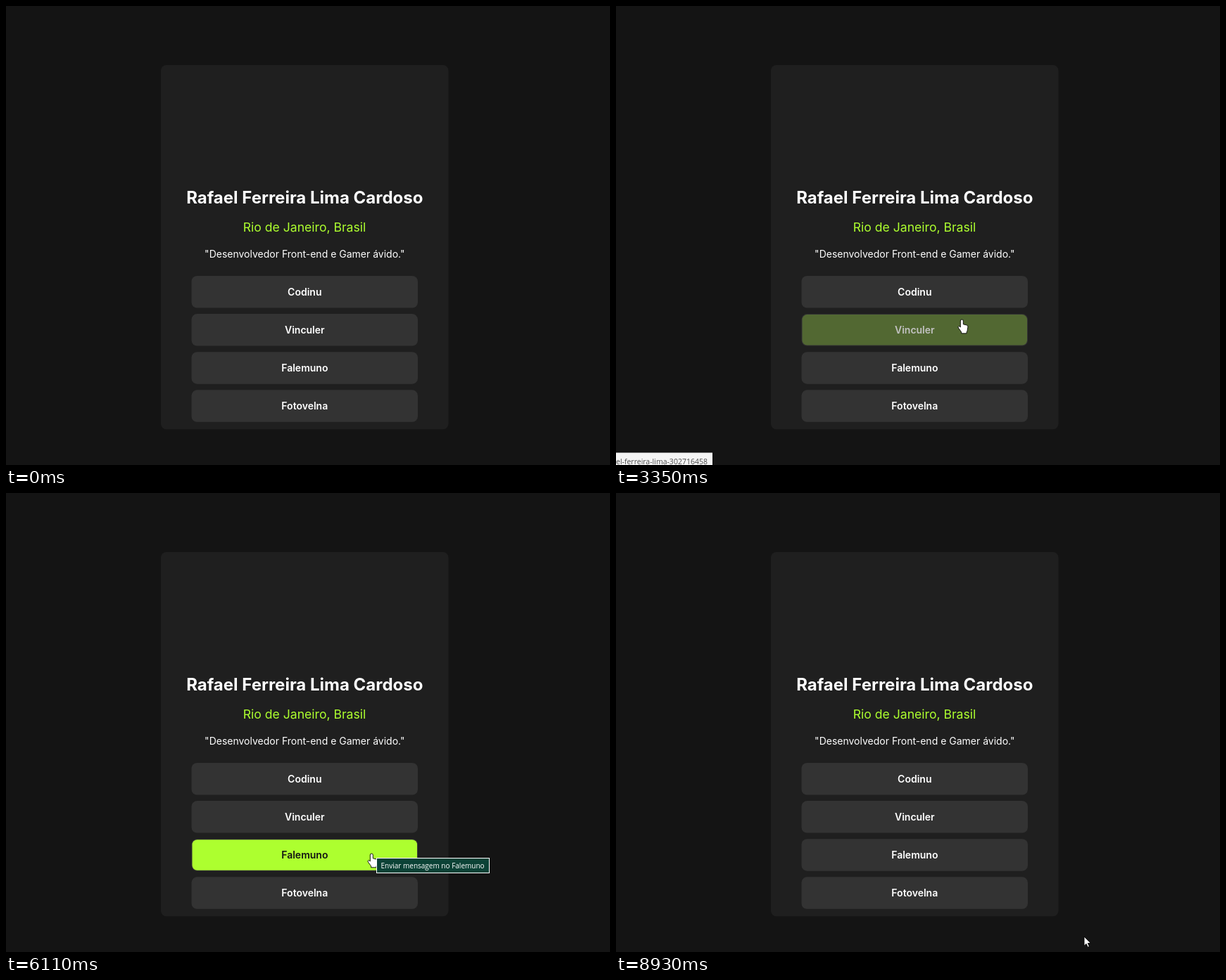
Write an HTML page that moves like this. It is 858x653 px and loops after 9.13 s.

```html
<!DOCTYPE html>
<html lang="pt-BR">
<head>
<meta charset="utf-8">
<title>Perfil</title>
<style>
  html, body { margin: 0; width: 100%; height: 100%; overflow: hidden; background: #141414; }
  svg { display: block; width: 858px; height: 653px; }
  text { font-family: Inter, sans-serif; fill: #fff; }
  .mid { text-anchor: middle; }
  .small text { font: 10px "Open Sans", "Noto Sans", sans-serif; }
  #status text { font-size: 10.5px; fill: #4a4a4a; }
  #hand, #arrow { fill: #fff; stroke: #000; stroke-width: .9; stroke-linejoin: round; }
</style>
</head>
<body>
<svg viewBox="0 0 858 653">
  <rect width="858" height="653" fill="#141414"/>
  <rect x="220" y="84" width="408.5" height="518.3" rx="8" fill="#1f1f1f"/>
  <text class="mid" x="424.3" y="281" font-size="24" font-weight="700">Rafael Ferreira Lima Cardoso</text>
  <text class="mid" x="424" y="321" font-size="17.6" style="fill:#adff2f">Rio de Janeiro, Brasil</text>
  <text class="mid" x="424.3" y="358" font-size="14">"Desenvolvedor Front-end e Gamer ávido."</text>
  <g id="links"></g>
  <g id="status" class="small">
    <rect y="635.5" height="18" fill="#f5f5f5"/>
    <text y="652"></text>
  </g>
  <path id="arrow" d="M0 0V13.2L3.1 10.4L5.2 15.2L7.4 14.2L5.3 9.6H9.4Z"/>
  <path id="hand" d="M-2.7 2a2 2 0 0 1 4 0v4.8l5 1.2q1.8.5 1.6 2.5l-.8 5q-.2 1.5-1 2.3v2h-7.5v-2l-4-5.5q-1.2-2 .2-2.7 1-.4 2.5 1.3z"/>
  <g id="tip" class="small">
    <rect x=".5" y=".5" height="21" fill="#0b4236" stroke="#fff"/>
    <text x="6.5" y="15.2"></text>
  </g>
</svg>
<script>
const LOOP = 9130, FADE_IN = 300, FADE_OUT = 250, STATUS_LINGER = 500;
const BUTTON = { x: 263.5, y: 384, w: 321.5, h: 45.5, pitch: 54.1 };
const $ = id => document.getElementById(id);

const links = [
  { name: "Codinu", enter: 2032, tip: 2730, leave: 3060 },
  { name: "Vinculer", enter: 3296, tip: 3960, leave: 4425, url: "el-ferreira-lima-302716458" },
  { name: "Falemuno", enter: 4597, tip: 5640, leave: 6130, hint: "Enviar mensagem no Falemuno" },
  { name: "Fotovelna", enter: 6430, tip: 7290, leave: 7880, url: "aolimas27/" }
];

// Each move of the pointer runs from one stop to the next.
const moves = [
  { from: 720, to: 1630, x: 343, y: 263 },
  { from: 1690, to: 2080, x: 479, y: 391 },
  { from: 3060, to: 3385, x: 492, y: 448 },
  { from: 4425, to: 4685, x: 518, y: 506 },
  { from: 5640, to: 5710, x: 520, y: 513 },
  { from: 6130, to: 6640, x: 541, y: 565 },
  { from: 7880, to: 8930, x: 665, y: 631 }
];

const buttonTop = i => BUTTON.y + BUTTON.pitch * i;
$("links").innerHTML = links.map(({ name }, i) => {
  const { x, w, h } = BUTTON, y = buttonTop(i);
  return `<rect x="${x}" y="${y}" width="${w}" height="${h}" rx="8" fill="#333"/>
    <rect class="face" x="${x + 1}" y="${y + 1}" width="${w - 2}" height="${h - 2}" rx="7"/>
    <text class="mid label" x="424.3" y="${y + 28}" font-size="14" font-weight="600">${name}</text>`;
}).join("");
const faces = document.querySelectorAll(".face"), labels = document.querySelectorAll(".label");

const clamp = v => Math.min(1, Math.max(0, v));
const mix = (a, b, p) => a + (b - a) * p;
const blend = (a, b, p) => `rgb(${a.map((v, i) => Math.round(mix(v, b[i], p)))})`;
const smooth = p => p * p * (3 - 2 * p);
const show = (el, on) => { el.style.display = on ? "" : "none"; };

// CSS "ease": cubic-bezier(.25, .1, .25, 1), solved by bisection
function ease(x) {
  x = clamp(x);
  const curve = (a, b, s) => 3 * a * s * (1 - s) ** 2 + 3 * b * s * s * (1 - s) + s ** 3;
  let lo = 0, hi = 1;
  for (let i = 0; i < 20; i++) {
    const s = (lo + hi) / 2;
    if (curve(.25, .25, s) < x) lo = s; else hi = s;
  }
  return curve(.1, 1, lo);
}

function pointerAt(t) {
  return moves.reduce((pos, move) => {
    const p = smooth(clamp((t - move.from) / (move.to - move.from)));
    return { x: mix(pos.x, move.x, p), y: mix(pos.y, move.y, p) };
  }, { x: 16, y: 45 });
}

function overButton({ x, y }) {
  return x > BUTTON.x && x < BUTTON.x + BUTTON.w &&
    links.some((_, i) => y >= buttonTop(i) && y <= buttonTop(i) + BUTTON.h);
}

// Sets the text of a box and fits the box around it.
function fillBox(group, content, padding) {
  const [box, text] = group.children;
  text.textContent = content;
  box.setAttribute("width", Math.round(text.getComputedTextLength()) + padding);
}

function draw(t) {
  links.forEach(({ enter, leave }, i) => {
    const p = ease((t - enter) / FADE_IN) * (1 - ease((t - leave) / FADE_OUT));
    faces[i].style.fill = blend([51, 51, 51], [173, 255, 47], p);
    labels[i].style.fill = blend([255, 255, 255], [20, 20, 20], p);
  });

  const pointer = pointerAt(t), hand = overButton(pointer);
  show($("hand"), hand);
  show($("arrow"), !hand && t >= moves[0].from);
  for (const id of ["hand", "arrow"]) {
    $(id).setAttribute("transform", `translate(${Math.round(pointer.x)} ${Math.round(pointer.y)})`);
  }

  const hinted = links.find(l => t >= l.tip && t < l.leave);
  show($("tip"), hinted);
  if (hinted) {
    const { x, y } = pointerAt(hinted.tip);
    $("tip").setAttribute("transform", `translate(${Math.round(x) + 8} ${Math.round(y) + 13})`);
    fillBox($("tip"), hinted.hint || `Visitar ${hinted.name}`, 13);
  }

  const visited = links.filter(l => t >= l.enter).pop();
  const status = visited && visited.url && t < visited.leave + STATUS_LINGER;
  show($("status"), status);
  if (status) fillBox($("status"), visited.url, 7);
}

const start = performance.now();
function tick() {
  draw((performance.now() - start) % LOOP);
  requestAnimationFrame(tick);
}
tick();
</script>
</body>
</html>
```
